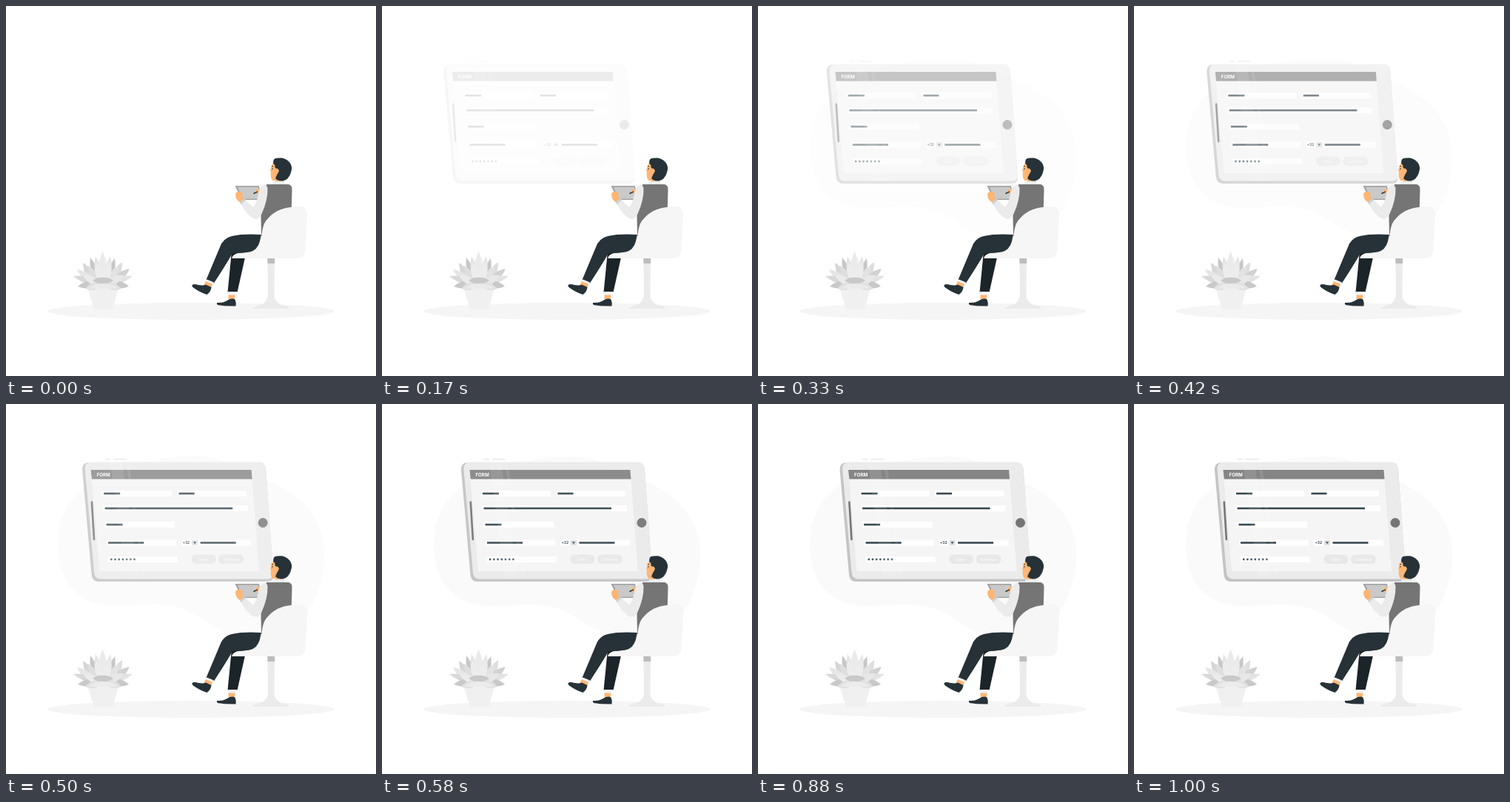
Write an HTML page that moves like this. It is 500x500 px and loops after 1.04 s.

```html
<!DOCTYPE html>
<html lang="en">
<head>
<meta charset="utf-8">
<title>Form on a tablet</title>
<style>
  html, body { margin: 0; width: 100%; height: 100%; overflow: hidden; background: #fff; }
  svg { display: block; width: 100vw; height: 100vh; }
  text { font-family: Inter, "Open Sans", sans-serif; font-weight: 700; }
</style>
</head>
<body>
<svg viewBox="0 0 500 500">
  <path id="blob" fill="#fafafa" d="M70 190C70 150 90 118 125 100C165 80 220 69 265 71C300 74 325 90 355 104C405 125 430 160 430 205C430 250 410 290 375 312C345 328 305 315 275 297C250 280 235 271 200 271C170 271 145 277 115 268C85 256 70 225 70 190Z"/>

  <ellipse cx="250" cy="412.5" rx="193.5" ry="11.5" fill="#f5f5f5"/>
  <path fill="#f0f0f0" d="M110 380H152L144.500 409.500H119Z"/>
  <g id="plant"></g>

  <g id="tablet">
    <path fill="#f0f0f0" d="M139 75Q139 73.500 141 73.500H147V76H139ZM151 73.500H167Q169 73.500 169 76H151Z"/>
    <path fill="#c4c4c4" d="M117 79H348Q356 79 357 88L367 231Q368 240 359 240H131Q122.500 240 121.500 231L109 89Q108.500 80 117 79Z"/>
    <path fill="#ebebeb" d="M121 78.500H347Q356 78.500 357 88L367 228Q368 236.500 359 236.500H134Q126 236.500 125 228L112.500 88Q112 79 121 78.500Z"/>
    <path fill="#f5f5f5" d="M121.500 101H338.500L348 226H132Z"/>
    <path fill="#858585" d="M120.500 89H337.500L338.500 101.500H121.800Z"/>
    <path stroke="#757575" stroke-width="2.600" stroke-linecap="round" d="M121.800 132.500L124.900 183"/>
    <circle cx="353" cy="160.500" r="6.500" fill="#757575"/>
    <text x="128.500" y="97.800" font-size="6.200" fill="#fff">FORM</text>
    <g id="fields"></g>
    <text x="244.500" y="189.300" font-size="4.900" fill="#37474f">+32</text>
    <rect x="257" y="184" width="8" height="7" fill="#e0e0e0"/>
    <path fill="#455a64" d="M258.800 186.200H263.200L261 189.300Z"/>
    <g fill="#e8e8e8">
      <rect x="256.500" y="203.500" width="33" height="12.500" rx="6.200"/>
      <rect x="293" y="203.500" width="34" height="12.500" rx="6.200"/>
    </g>
    <g font-size="5" fill="#f7f7f7" text-anchor="middle">
      <text x="272.500" y="211.500">Save</text>
      <text x="310" y="211.500">Continue</text>
    </g>
    <path fill="#fff" opacity=".1" d="M147 79H163L186 236H168ZM168 79H172L195 236H191Z"/>
  </g>

  <!-- chair stem -->
  <path fill="#ebebeb" d="M353.500 341H363L362.500 391Q363 402 376 405Q383 406 383 409H333Q333 406 341 405Q353 402 354 391Z"/>
  <path fill="#bdbdbd" d="M353.300 341H363.200V348H353.500Z"/>

  <!-- far leg -->
  <path fill="#1b2428" d="M305 331H325L312.500 387H299.500Z"/>
  <path fill="#f5f5f5" d="M299.500 386H313L310.500 391H300Z"/>
  <path fill="#ffb573" d="M300.500 390.500H309.500L309 396H300.500Z"/>
  <path fill="#263238" d="M285 401Q293 401.500 298 398.500Q304 394 309.500 396.500Q311.500 401 310.500 405.500Q297 406 286 404Q284.500 403 285 401Z"/>

  <!-- torso and seat -->
  <path fill="#757575" d="M352 241H382Q387 242 386.500 249L385 300L345 311L344.500 283Z"/>
  <path fill="#f6f6f6" d="M305 341Q306 335 316 333.500Q338 333 344 320C347 302 346 295 355 286C364 276 377 271 399 271Q408 273 407 284L404.500 330Q404 341 393 341Z"/>

  <!-- near leg -->
  <path fill="#263238" d="M345 309L343 318Q340 330 329 332.500Q318 334 306 334Q302 342 281 374.500L270.500 370L289 326Q293 314 305 311Q320 307.500 345 309Z"/>
  <path fill="#f5f5f5" d="M271.500 369.500L281 373.500L279 376.500L269.500 372Z"/>
  <path fill="#ffb573" d="M270 372L279 376L277 382L267 378Z"/>
  <path fill="#263238" d="M251.500 377Q254 375 260 377Q267 378 270 376.500L277.500 380Q277 386 271.500 390Q262 387 253 380.500Q251 379 251.500 377Z"/>

  <!-- hand-held tablet and arm -->
  <path fill="#9e9e9e" d="M309.500 243H342L345 262H319Z"/>
  <path fill="#c9c9c9" d="M312.500 244.500H341L344 260.800H320.500Z"/>
  <path fill="#ffb573" d="M310 254Q312 249.500 316 251L320 252.500Q318 256 321 261L316.500 265.500Q310 262 310 254ZM337.500 249Q341 246 346 247V256L337 253Z"/>
  <path stroke="#263238" stroke-width="1.500" d="M334.500 253.500L340 250.800"/>
  <path fill="#ebebeb" d="M348 242Q353 241 353.500 247Q354 262 345.500 281Q340 292 331 285Q322 277 316.500 266L322.500 260.500Q329 268 334 271.500Q339 266 340.500 256Q342 245 348 242Z"/>
  <path fill="#c9d0d3" d="M316 265.500L321.800 260L324 262L317.700 268Z"/>

  <!-- head -->
  <path fill="#ffb573" d="M361 212Q358.500 216 358.300 219L356.800 222.500L358 224Q357 233 360 235.500Q363 236.500 364 235.500V239H374V218Z"/>
  <path fill="#e8eef0" d="M361.500 236.500Q368 238 375.500 235.500L376 241H361Z"/>
  <path fill="#263238" d="M361.500 209Q362 205 368 205.500Q377 204.500 383 211Q388 217 385 225Q382 235 374 236.500Q367 236.500 364 233Q366 228 368.500 224Q369 220 366 219.500Q363 220 363.500 215Q360 213.500 361.500 209Z"/>
  <circle cx="365.700" cy="222.800" r="2.800" fill="#ffb573"/>
  <path stroke="#263238" stroke-width=".9" d="M358.800 217L361 216.300M360 219V221"/>
</svg>
<script>
const $ = id => document.getElementById(id);

// Petal: tip x, tip y, base x, base y, half width, grey
const petals = [
  [114, 340, 124, 374, 6, '#c7c7c7'], [147, 341, 138, 374, 6, '#c7c7c7'],
  [104, 347, 121, 376, 7, '#d6d6d6'], [157, 346, 142, 376, 7, '#dedede'],
  [121, 338, 127, 374, 6, '#e3e3e3'], [141, 338, 136, 374, 6, '#e6e6e6'],
  [130.5, 331.5, 131, 374, 8, '#ebebeb'],
  [96, 356, 122, 376, 7, '#e6e6e6'], [167, 355, 141, 376, 7, '#d2d2d2'],
  [111, 351, 125, 376, 7, '#dedede'], [152, 351, 138, 376, 7, '#e3e3e3'],
  [122, 346, 129, 376, 7, '#ededed'], [140, 346, 134, 376, 7, '#ededed'],
  [91, 365, 124, 375, 6, '#d9d9d9'], [171, 365, 139, 375, 6, '#e3e3e3'],
  [97, 379, 125, 374, 7, '#c9c9c9'], [166, 379, 139, 374, 7, '#c9c9c9'],
  [104, 364, 128, 377, 7, '#ebebeb'], [159, 364, 135, 377, 7, '#e8e8e8'],
  [107, 382, 130, 376, 7, '#e0e0e0'], [156, 382, 133, 376, 7, '#e0e0e0']
];
const petal = ([x, y, bx, by, w, fill]) => {
  const dx = x - bx, dy = y - by, len = Math.hypot(dx, dy);
  const mx = bx + dx * .45, my = by + dy * .45;
  const nx = -dy / len * w * 1.4, ny = dx / len * w * 1.4;
  return `<path fill="${fill}" d="M${bx} ${by}Q${mx + nx} ${my + ny} ${x} ${y}Q${mx - nx} ${my - ny} ${bx} ${by}Z"/>`;
};
$('plant').innerHTML = petals.map(petal).join('') +
  '<path fill="#c9c9c9" d="M117 371Q124 366 131 367Q138 366 145 371Q138 376 131 375Q124 376 117 371Z"/>' +
  '<path fill="#ebebeb" d="M111 382Q120 374 131 375Q143 374 152 382Z"/>';

// Field: left, centre y, width, ink length
const fields = [
  [136, 121, 94, 22], [237.5, 121, 93.5, 21], [137.5, 141, 195.5, 172.5],
  [139.5, 163, 94.5, 22], [142, 187.5, 94, 48], [243, 187.5, 94, 48, 25.5], [144, 210, 94, 0]
];
const field = ([x, y, w, ink, indent = 2]) =>
  `<rect x="${x}" y="${y - 4}" width="${w}" height="8" fill="#fff"/>
   <rect x="${x + indent}" y="${y - 1.3}" width="${ink}" height="2.6" fill="#37474f"/>`;
const dot = (_, i) => `<circle cx="${148.2 + i * 5.2}" cy="210" r="1.4" fill="#455a64"/>`;
$('fields').innerHTML = fields.map(field).join('') + Array.from({ length: 7 }, dot).join('');

const cubic = (a, b, s) => 3 * (1 - s) ** 2 * s * a + 3 * (1 - s) * s * s * b + s ** 3;

// Slide easing: cubic-bezier(.36, -.01, .5, 1.38)
function ease(x) {
  let lo = 0, hi = 1;
  for (let i = 0; i < 24; i++) {
    const mid = (lo + hi) / 2;
    if (cubic(.36, .5, mid) < x) lo = mid; else hi = mid;
  }
  return cubic(-.01, 1.38, lo);
}

const LOOP = 1040, STEP = 1000 / 24;

function draw(now) {
  const step = Math.floor((now % LOOP - 35) / STEP);
  const p = step < 1 ? 0 : ease(Math.min(1, (step * STEP + 75) / 1000));
  const alpha = Math.min(1, Math.max(0, p));
  $('tablet').setAttribute('transform', `translate(${30 * (p - 1)} 0)`);
  $('tablet').setAttribute('opacity', alpha);
  $('blob').setAttribute('opacity', alpha);
}

const start = performance.now();
(function tick() {
  draw(performance.now() - start);
  requestAnimationFrame(tick);
})();
</script>
</body>
</html>
```
